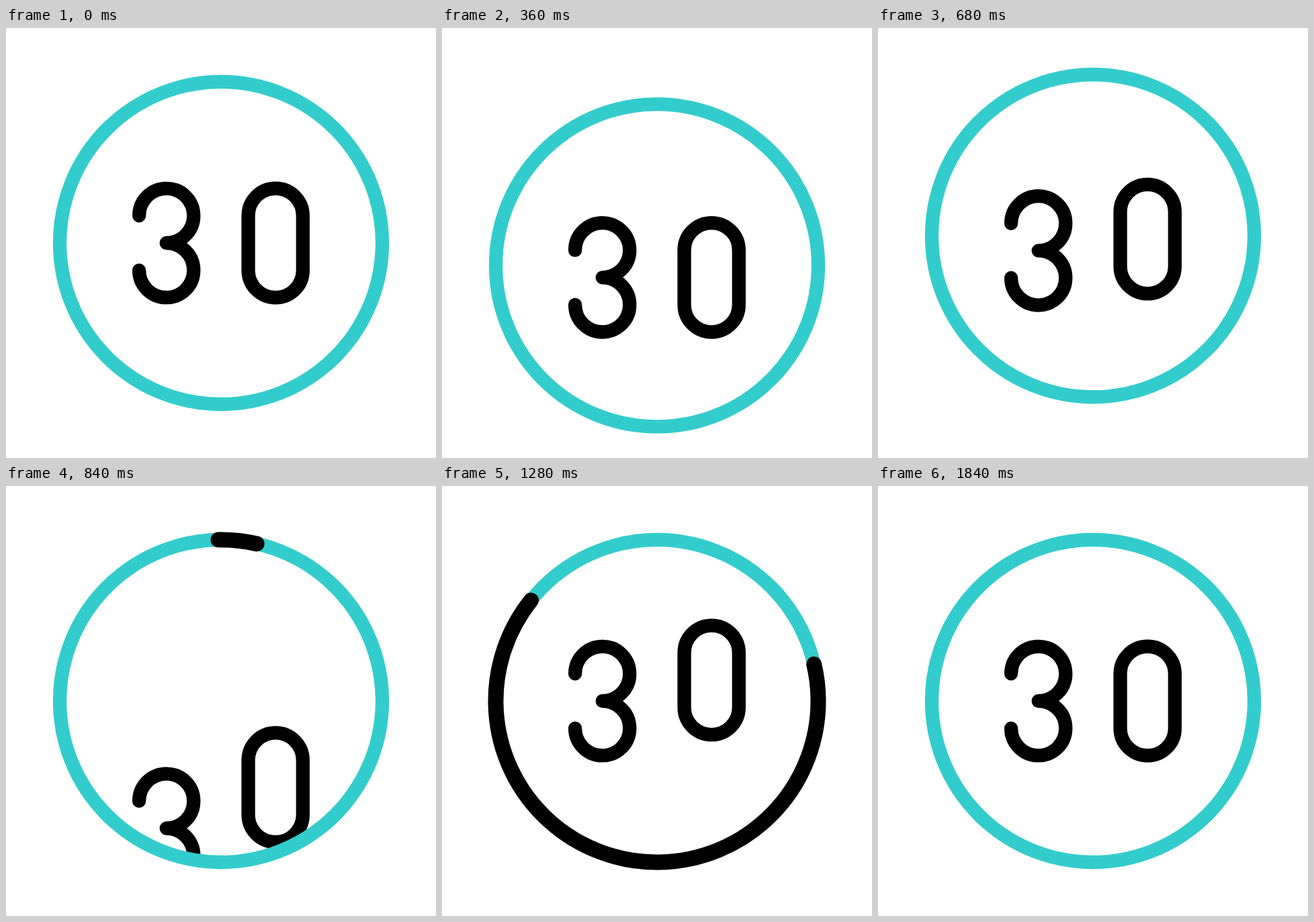
An HTML page for the animation above (2000 ms loop, 640 by 640 pixels).

```html
<!DOCTYPE html>
<html lang="en">
<head>
<meta charset="utf-8">
<title>Thirty second timer</title>
<style>
  html, body { margin: 0; width: 100%; height: 100%; overflow: hidden; background: #fff; }
  svg { display: block; width: 100%; height: 100%; }
  svg * { fill: none; }
  .digit { stroke: #000; stroke-width: 20.3; stroke-linecap: round; stroke-linejoin: round; }
  #progress { stroke: #000; stroke-width: 23; stroke-linecap: round; }
  #ring { stroke: #3cc; stroke-width: 20.3; }
  #window circle { fill: #fff; }
</style>
</head>
<body>
<svg viewBox="0 0 640 640">
  <defs>
    <clipPath id="window"><circle cx="320" cy="320" r="240"/></clipPath>
    <path id="three" class="digit" d="M198.1 279.4A40.6 40.6 0 1 1 238.75 320A40.6 40.6 0 1 1 198.1 360.6"/>
    <rect id="zero" class="digit" x="360.6" y="238.75" width="81.25" height="162.5" rx="40.6"/>
  </defs>
  <g id="dial">
    <g clip-path="url(#window)">
      <g id="threeReel"><use href="#three"/><use href="#three" y="-505"/></g>
      <g id="zeroReel"><use href="#zero"/><use href="#zero" y="-505"/></g>
    </g>
    <circle id="ring" cx="320" cy="320" r="240"/>
  </g>
  <circle id="progress" cx="320" cy="320" r="240" pathLength="1" transform="rotate(-90.95 320 320)"/>
</svg>
<script>
  const LOOP = 2000, STEP = 40, REEL = 505;
  const byId = id => document.getElementById(id);
  const dial = byId('dial'), progress = byId('progress');
  const threeReel = byId('threeReel'), zeroReel = byId('zeroReel');

  const smooth = x => x * x * (3 - 2 * x);

  // Cubic Bezier easing (0.28, 0, 0.6, 1), inverted by bisection.
  function spin(x) {
    let low = 0, high = 1;
    for (let i = 0; i < 30; i++) {
      const s = (low + high) / 2, r = 1 - s;
      const at = 3 * 0.28 * s * r * r + 3 * 0.6 * s * s * r + s * s * s;
      if (at < x) low = s; else high = s;
    }
    return smooth(low);
  }

  // Keys are [time, value, easing towards this key].
  function track(keys, t) {
    if (t <= keys[0][0]) return keys[0][1];
    for (let i = 1; i < keys.length; i++) {
      const [t0, v0] = keys[i - 1];
      const [t1, v1, ease = smooth] = keys[i];
      if (t < t1) return v0 + (v1 - v0) * ease((t - t0) / (t1 - t0));
    }
    return keys[keys.length - 1][1];
  }

  const bounce = [[160, 0], [360, 33.4], [560, -30.6], [760, 0]];
  const reel = end => [[160, 0], [360, 17.9], [560, -32.2], [end, REEL, spin]];
  const threeKeys = reel(1264), zeroKeys = reel(1428);
  const headKeys = [[760, 0], [1440, 1]];
  const tailKeys = [[1040, 0], [1840, 1]];

  const shift = (node, y) => node.setAttribute('transform', `translate(0 ${y.toFixed(3)})`);

  function draw(t) {
    shift(dial, track(bounce, t));
    shift(threeReel, track(threeKeys, t));
    shift(zeroReel, track(zeroKeys, t));

    const tail = track(tailKeys, t);
    const length = track(headKeys, t) - tail;
    progress.style.display = length > 0 ? '' : 'none';
    progress.setAttribute('stroke-dasharray', `${length} 1`);
    progress.setAttribute('stroke-dashoffset', -tail);
  }

  const start = performance.now();
  function tick() {
    const t = (performance.now() - start) % LOOP;
    draw(Math.floor(t / STEP) * STEP);
    requestAnimationFrame(tick);
  }
  tick();
</script>
</body>
</html>
```
